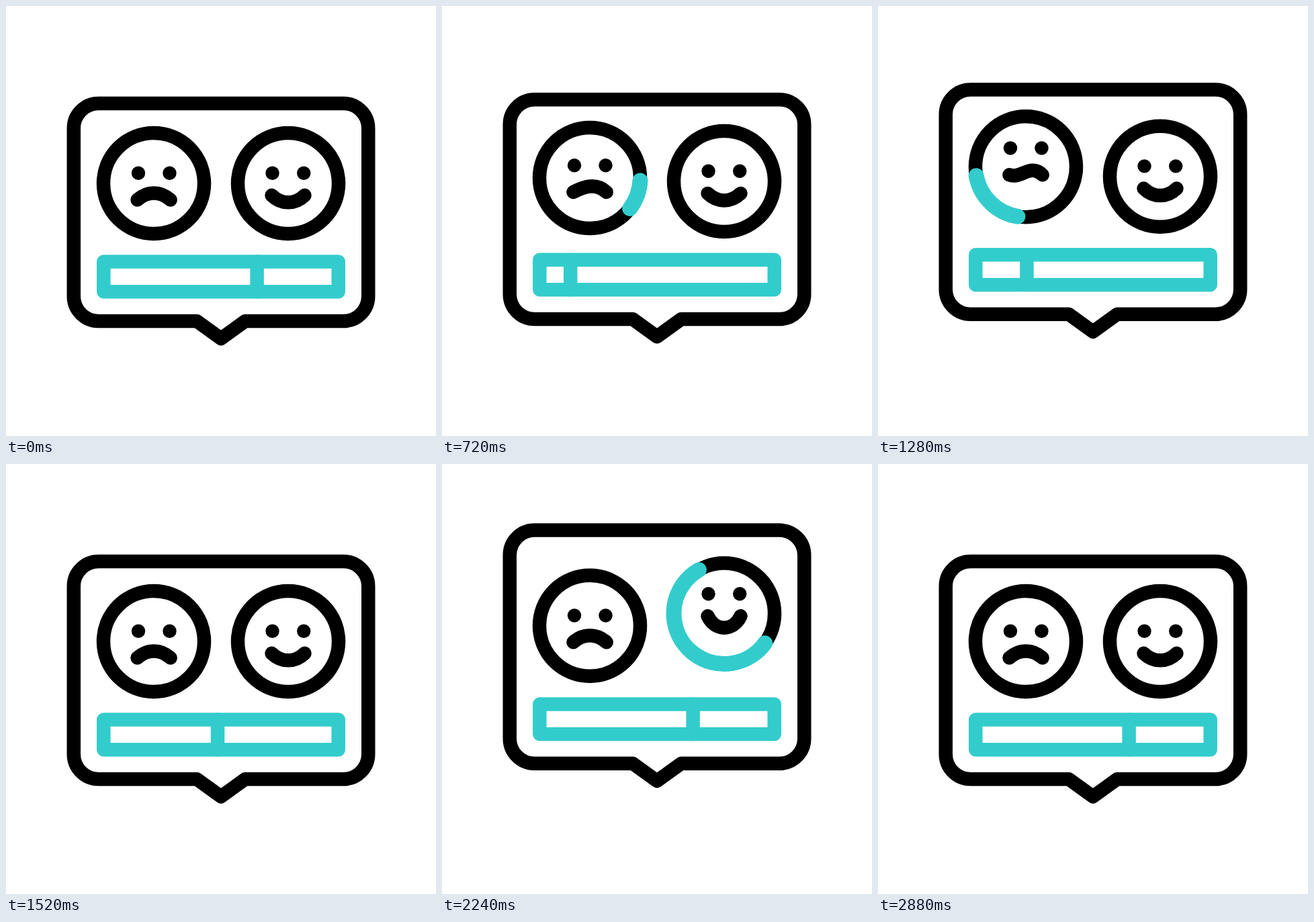
Recreate the animation shown at these times as an HTML page. Size 640 by 640 pixels, loop 3 s.

```html
<!DOCTYPE html>
<html lang="en">
<head>
<meta charset="utf-8">
<title>Feedback bubble</title>
<style>
  html, body { margin: 0; width: 100%; height: 100%; overflow: hidden; background: #fff; }
  svg { display: block; width: 100vw; height: 100vh; }
  .line { fill: none; stroke: #000; stroke-width: 20.5; stroke-linecap: round; stroke-linejoin: round; }
  .teal { stroke: #33cccc; }
  .arc { stroke-width: 23; }
</style>
</head>
<body>
<svg viewBox="0 0 640 640">
  <path id="bubble" class="line"/>
  <g id="bar">
    <rect class="line teal" x="145.3" y="380.6" width="349.4" height="44.6"/>
    <path id="divider" class="line teal" d="M0 380.6V425.2"/>
  </g>
  <g id="sad">
    <circle class="line" cx="220" cy="264" r="75"/>
    <circle class="line teal arc" cx="220" cy="264" r="75" pathLength="360"/>
    <g class="features">
      <circle cx="197" cy="248.7" r="10.2"/>
      <circle cx="243.5" cy="248.7" r="10.2"/>
      <path class="line mouth"/>
    </g>
  </g>
  <g id="happy">
    <circle class="line" cx="420" cy="264" r="75"/>
    <circle class="line teal arc" cx="420" cy="264" r="75" pathLength="360"/>
    <g class="features">
      <circle cx="396.5" cy="248.7" r="10.2"/>
      <circle cx="443.2" cy="248.7" r="10.2"/>
      <path class="line mouth"/>
    </g>
  </g>
</svg>
<script>
const LOOP = 3000, STEP = 40;
const SHIFT = 1368; // the happy face repeats the sad one's reaction this much later

const LIFT = [[667, 0], [980, 76.5], [1435, 0], [2040, 0], [2390, 76.5], [2400, 76.5], [2850, 0]];
const SLIDE = [[205, 373.6], [560, 187], [870, 195], [1122, 195], [1790, 382], [2160, 373.6]];
const HOP = [[640, 0], [870, 18.3], [1215, 18.3], [1435, 0]];
const MOOD = [[615, 0], [990, 1], [1190, 1], [1430, 0]];
const SPIN = [[665, 0], [1385, 180]];
const HEAD = [[638, 0], [1068, 360]];
const TAIL = [[893, 0], [1433, 360]];

const $ = id => document.getElementById(id);
const mix = (a, b, k) => a + (b - a) * k;

// Eased value at time t from a list of [time, value] keys
function at(keys, t) {
  if (t <= keys[0][0]) return keys[0][1];
  for (let i = 1; i < keys.length; i++) {
    const [t0, a] = keys[i - 1], [t1, b] = keys[i];
    if (t < t1) {
      const u = (t - t0) / (t1 - t0);
      return mix(a, b, u * u * (3 - 2 * u));
    }
  }
  return keys[keys.length - 1][1];
}

const moveY = (el, y) => el.setAttribute('transform', `translate(0 ${-y})`);

function bubblePath(lift) {
  const top = 145 - lift, low = 469 - lift / 2;
  return `M138 ${top}H502a37 37 0 0 1 37.2 37V${low - 37}a37 37 0 0 1 -37.2 37` +
    `H356L320 ${low + 26}L284 ${low}H138a37 37 0 0 1 -37.2 -37V${top + 37}a37 37 0 0 1 37.2 -37Z`;
}

function sadMouth(k) {
  return `M195.5 288.5C${mix(210, 213, k)} ${288.5 + mix(-13.5, 16.4, k)} ` +
    `${mix(230, 225, k)} ${288.5 + mix(-13.5, -19.5, k)} 244.7 288.5`;
}

function happyMouth(k) {
  const dip = 281.8 + mix(14, 26, k), bend = mix(10, 15, k);
  return `M395.5 281.8C${420 - bend} ${dip} ${420 + bend} ${dip} 444.5 281.8`;
}

function drawFace(face, t, base, mouth) {
  const mood = at(MOOD, t), arc = face.querySelector('.arc');
  const tail = at(TAIL, t), length = at(HEAD, t) - tail;
  const cx = arc.getAttribute('cx');
  moveY(face, base + at(HOP, t));
  moveY(face.querySelector('.features'), 18.3 * mood);
  face.querySelector('.mouth').setAttribute('d', mouth(mood));
  arc.style.display = length > 0.1 ? '' : 'none';
  arc.setAttribute('stroke-dasharray', `${length} 720`);
  arc.setAttribute('transform', `rotate(${at(SPIN, t) + tail} ${cx} 264)`);
}

function draw(t) {
  const lift = at(LIFT, t);
  $('bubble').setAttribute('d', bubblePath(lift));
  moveY($('bar'), lift / 2);
  $('divider').setAttribute('transform', `translate(${at(SLIDE, t)} 0)`);
  drawFace($('sad'), t, lift / 2, sadMouth);
  drawFace($('happy'), t - SHIFT, lift / 2, happyMouth);
}

const start = performance.now();
function tick() {
  const t = (performance.now() - start) % LOOP;
  draw(Math.floor(t / STEP) * STEP);
  requestAnimationFrame(tick);
}
tick();
</script>
</body>
</html>
```
